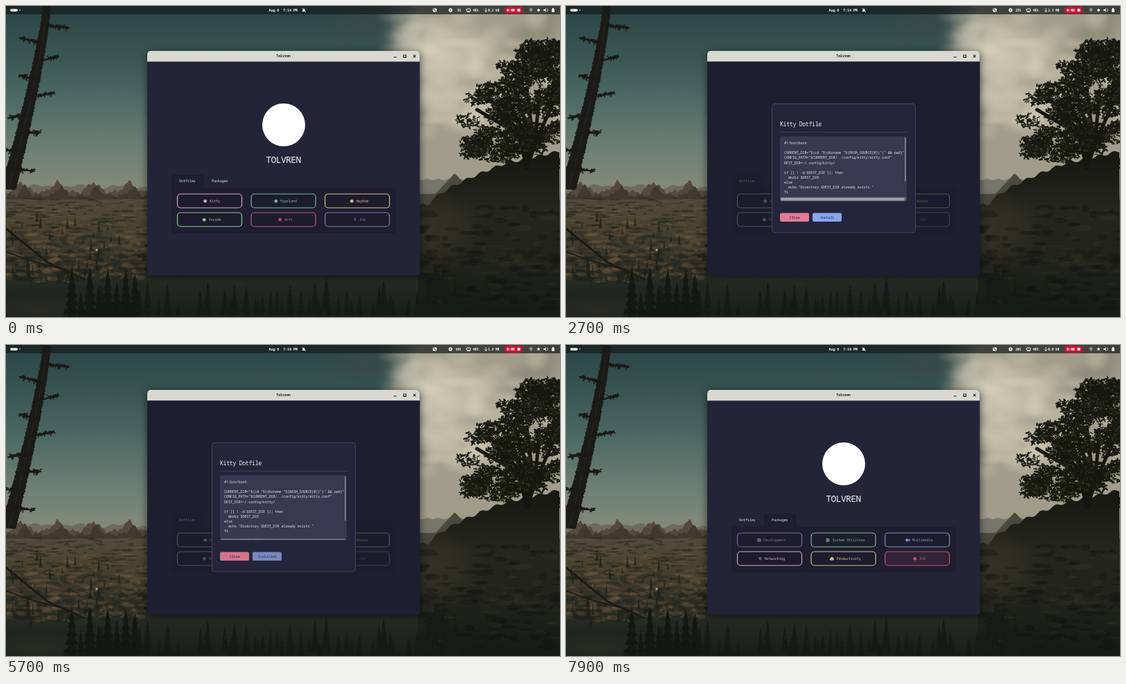
Write an HTML page with a canvas that moves like this. It is 800 px wide and 450 px high and loops after 8 s.

```html
<!DOCTYPE html>
<html lang="en">
<head>
<meta charset="utf-8">
<title>Dotfile installer</title>
<style>
html, body { margin: 0; width: 100%; height: 100%; overflow: hidden; background: #14170f; }
canvas { display: block; width: 800px; height: 450px; }
</style>
</head>
<body>
<canvas id="stage" width="800" height="450"></canvas>
<script>
const LOOP = 8000;
const APP = 'Tolvren';
const ctx = document.getElementById('stage').getContext('2d');
const wallpaper = document.createElement('canvas');
wallpaper.width = 800;
wallpaper.height = 450;

const clamp = v => Math.max(0, Math.min(1, v));
const ramp = (t, from, to) => clamp((t - from) / (to - from));
const ease = p => 1 - (1 - p) ** 3;

function seeded(seed) {
  return () => (seed = (seed * 16807) % 2147483647) / 2147483647;
}

function box(c, x, y, w, h, r, fill, stroke, line = 1) {
  c.beginPath();
  c.roundRect(x, y, w, h, r);
  if (fill) { c.fillStyle = fill; c.fill(); }
  if (stroke) { c.strokeStyle = stroke; c.lineWidth = line; c.stroke(); }
}

function oval(c, x, y, rx, ry, fill) {
  c.beginPath();
  c.ellipse(x, y, rx, ry, 0, 0, 7);
  c.fillStyle = fill;
  c.fill();
}
const dot = (c, x, y, r, fill) => oval(c, x, y, r, r, fill);

function poly(c, fill, ...p) {
  c.beginPath();
  for (let i = 0; i < p.length; i += 2) c.lineTo(p[i], p[i + 1]);
  c.fillStyle = fill;
  c.fill();
}

function path(c, color, width, ...p) {
  c.beginPath();
  for (let i = 0; i < p.length; i += 2) c.lineTo(p[i], p[i + 1]);
  c.strokeStyle = color;
  c.lineWidth = width;
  c.stroke();
}

function arc(x, y, r, from, to, color, width) {
  ctx.beginPath();
  ctx.arc(x, y, r, from, to);
  ctx.strokeStyle = color;
  ctx.lineWidth = width;
  ctx.stroke();
}

// y is the vertical middle of the capitals
function text(str, x, y, color, { size = 5.35, align = 'left', weight = 500 } = {}) {
  ctx.font = `${weight} ${size}px "Noto Sans Mono", "DejaVu Sans Mono", monospace`;
  ctx.letterSpacing = -0.05 * size + 'px';
  ctx.textAlign = align;
  ctx.fillStyle = color;
  ctx.fillText(str, x, y + size * 0.36);
}

// ---- wallpaper ----

function fade(c, top, bottom, ...colors) {
  const g = c.createLinearGradient(0, top, 0, bottom);
  colors.forEach((color, i) => g.addColorStop(i / (colors.length - 1), color));
  return g;
}

function glow(c, x, y, rx, ry, rgb, alpha) {
  c.save();
  c.translate(x, y);
  c.scale(rx, ry);
  const g = c.createRadialGradient(0, 0, 0, 0, 0, 1);
  [1, 0.6, 0].forEach((a, i) => g.addColorStop(i / 2, `rgba(${rgb},${alpha * a})`));
  c.fillStyle = g;
  c.fillRect(-1, -1, 2, 2);
  c.restore();
}

// fills everything below the curve y = height(x)
function land(c, fill, from, to, height) {
  c.beginPath();
  c.moveTo(from, 450);
  for (let x = from; x <= to; x += 2) c.lineTo(x, height(x));
  c.lineTo(to, 450);
  c.fillStyle = fill;
  c.fill();
}

function conifer(c, x, base, h, color) {
  for (let i = 0; i < 6; i++) {
    const top = base - h + i * h * 0.15, w = h * (0.05 + i * 0.025);
    poly(c, color, x, top, x - w, top + h * 0.25, x + w, top + h * 0.25);
  }
}

function drawSky(c) {
  c.fillStyle = fade(c, 0, 270, '#294445', '#385553', '#4d6a64', '#6b7f75', '#858a7b');
  c.fillRect(0, 0, 800, 450);
  const haze = c.createLinearGradient(535, 0, 610, 0);
  haze.addColorStop(0, 'rgba(162,157,139,0)');
  haze.addColorStop(1, 'rgba(162,157,139,1)');
  c.fillStyle = haze;
  c.fillRect(535, 0, 265, 270);
  const rnd = seeded(41);
  for (let i = 0; i < 110; i++) {
    const x = 560 + rnd() * 240, y = 10 + rnd() * 170;
    const bright = rnd() < 0.85 - (x - 560) / 600;
    glow(c, x, y, 14 + rnd() * 26, 8 + rnd() * 18, bright ? '212,205,183' : '130,126,111', 0.35);
  }
  glow(c, 630, 75, 90, 65, '222,215,193', 0.75);
  glow(c, 520, 25, 60, 40, '58,74,71', 0.7);
}

function drawValley(c) {
  const rnd = seeded(7);
  const peak = (x, width) => Math.max(0, 1 - Math.abs((x + 4) % 52 - 26) / width);
  const rough = x => 2 * Math.sin(x * 0.31) + 1.5 * Math.sin(x * 0.83);
  land(c, '#6d6b5d', 0, 598, x => 261 + rough(x / 3));
  land(c, '#54493c', 0, 598, x => 269 - 15 * peak(x, 17) + rough(x));
  land(c, '#40392f', 0, 598, x => 274 - 14 * peak(x - 5, 12) + rough(x + 9));
  c.fillStyle = fade(c, 278, 450, '#51493b', '#49412f', '#353329', '#222821', '#171e19');
  c.fillRect(0, 280, 800, 170);
  for (let i = 0; i < 520; i++) {
    const d = rnd(), x = rnd() * 215, y = 278 + d * 120;
    const shade = rnd() < 0.62 ? 'rgba(27,33,26,.4)' : 'rgba(122,97,67,.3)';
    oval(c, x, y, 2 + rnd() * 9, 0.8 + d * 2.5, shade);
  }
  for (let i = 0; i < 45; i++) {
    conifer(c, rnd() * 210, 310 + rnd() * 100, 7 + rnd() * 13, 'rgba(26,32,25,.7)');
  }
  glow(c, 45, 440, 110, 25, '48,48,38', 0.7);
  for (let i = 0; i < 60; i++) {
    conifer(c, 80 + rnd() * 540, 440 + rnd() * 25, 20 + rnd() * 30, '#151c17');
  }
  for (let i = 0; i < 8; i++) conifer(c, 95 + i * 13, 458, 45 + rnd() * 38, '#121812');
  dot(c, 131, 353, 1.8, '#aaa18a');
}

function drawRightSlope(c) {
  const rnd = seeded(93);
  land(c, '#77766a', 595, 700, x => 251 + Math.sin(x * 0.4));
  land(c, '#4b4a40', 595, 700, x => 272 - 30 * Math.max(0, 1 - Math.abs(x - 648) / 28));
  const slope = x => 288 - 60 * ramp(x, 610, 720) ** 0.7 - 18 * ramp(x, 720, 800) + 2 * Math.sin(x * 0.3);
  land(c, fade(c, 220, 450, '#171912', '#25261e', '#20231b', '#141a14'), 595, 800, slope);
  glow(c, 610, 325, 85, 60, '64,60,47', 0.6);
  for (let i = 0; i < 160; i++) {
    const x = 600 + rnd() * 200, y = 290 + rnd() * 150;
    oval(c, x, y, 3 + rnd() * 12, 1 + rnd() * 4, rnd() < 0.75 ? 'rgba(15,18,13,.3)' : 'rgba(75,66,48,.16)');
  }
  for (let i = 0; i < 14; i++) conifer(c, 600 + rnd() * 50, 420 + rnd() * 40, 25 + rnd() * 30, '#161d17');
}

function drawRightTree(c) {
  const rnd = seeded(23);
  c.lineCap = 'round';
  for (let i = 0; i < 7; i++) {
    path(c, '#14160f', 5, 752, 235, 740 + i * 5, 185, 680 + i * 18, 150 - 35 * Math.sin(i / 2));
  }
  for (let i = 0; i < 95; i++) {
    const y = 58 + rnd() * 172;
    const edge = 652 + 112 * ramp(y, 185, 50) ** 1.4 + 50 * ramp(y, 205, 230);
    const x = edge + rnd() * (812 - edge), spread = 12 + rnd() * 8;
    for (let j = 0; j < 60; j++) {
      const a = rnd() * 6.3, d = Math.sqrt(rnd()) * spread, tilt = rnd() * 6.3;
      const px = x + Math.cos(a) * d, py = y + Math.sin(a) * d * 0.6;
      path(c, rnd() < 0.8 ? '#171911' : '#2a2b20', 1 + rnd() * 1.6,
        px, py, px + Math.cos(tilt) * 4, py + Math.sin(tilt) * 3);
    }
  }
}

function drawLeftTree(c) {
  const bark = '#1b1a16', rnd = seeded(5);
  const center = y => 59 - 52 * (y / 250) ** 1.25;
  for (let y = 0; y < 265; y += 1.5) {
    const half = 4 + y * 0.021 + rnd() * 1.5;
    path(c, bark, 2, center(y) - half, y, center(y) + half, y + 1);
    path(c, 'rgba(84,74,57,.35)', 1, center(y), y, center(y) + rnd() * 3, y + 2);
  }
  for (let i = 0; i < 9; i++) {
    const y = 28 + i * 26, side = i % 2 ? -1 : 1, reach = side * (20 + rnd() * 16), rise = rnd() * 16 - 8;
    path(c, bark, 2.5, center(y), y, center(y) + reach, y + rise);
    for (let j = 0; j < 26; j++) {
      const p = rnd(), x = center(y) + reach * p, top = y + rise * p - 2;
      path(c, bark, 1.5, x, top, x + rnd() * 6 - 3, top + rnd() * 9 - 2);
    }
  }
  path(c, bark, 3, 0, 322, 28, 345, 60, 371, 113, 395);
  path(c, bark, 1.5, 0, 356, 38, 369, 82, 381);
}

function paintWallpaper() {
  const c = wallpaper.getContext('2d');
  [drawSky, drawValley, drawRightSlope, drawRightTree, drawLeftTree].forEach(draw => draw(c));
}

// ---- top bar ----

const CPU = ['3%', '25%', '23%', '12%', '16%', '26%'];
const NET = ['0.1 kB', '451 kB', '2.3 MB', '1.0 kB', '1.9 MB', '0.0 kB'];

function wifi(x, y, color, s = 1) {
  for (const r of [2, 4]) arc(x, y + 2 * s, r * s, -2.4, -0.74, color, s);
  dot(ctx, x, y + 1.7 * s, 0.9 * s, color);
}

function drawTopBar(t) {
  const white = '#eceee9', bold = { weight: 700 }, small = { size: 4.9, weight: 700 };
  ctx.fillStyle = 'rgba(22,28,28,.7)';
  ctx.fillRect(0, 0, 800, 12);
  box(ctx, 6, 4.3, 11, 3.6, 1.8, white);
  dot(ctx, 20, 6, 1.1, '#8d9491');
  text('Aug 6  7:14 PM', 379.5, 6, white, bold);
  poly(ctx, white, 427.5, 8, 430, 3, 432.5, 8);
  path(ctx, white, 0.8, 427, 3, 433, 9);

  const sample = Math.floor((t + 600) / 1500);
  box(ctx, 616.5, 3.5, 5.5, 5, 0.8, white);
  path(ctx, '#29302e', 1, 617.5, 4.5, 621, 7.5);
  dot(ctx, 642, 6, 2.7, white);
  dot(ctx, 642, 6, 1, '#747b77');
  text(CPU[sample], 657, 6, white, { ...small, align: 'right' });
  box(ctx, 665, 4, 5.5, 3.6, 0.6, null, white);
  path(ctx, white, 0.8, 666, 8.7, 670, 8.7);
  text('48%', 674, 6, white, small);
  path(ctx, white, 0.9, 693, 3, 693, 8.5);
  path(ctx, white, 0.9, 691, 6.5, 693, 8.7, 695, 6.5);
  text(NET[sample], 696, 6, white, small);

  box(ctx, 719, 1, 28, 10, 5, '#c51438');
  text('0:0' + Math.floor((t + 100) / 1000), 723, 6, '#fff', bold);
  box(ctx, 738.5, 4, 4, 4, 0.4, '#fff');

  wifi(758, 6, white, 0.9);
  dot(ctx, 769, 6, 2, white);
  box(ctx, 776, 5, 2, 2, 0, white);
  poly(ctx, white, 777, 6, 779.5, 3, 779.5, 9);
  arc(779.5, 6, 2.7, -0.9, 0.9, white, 0.9);
  box(ctx, 788, 4, 4, 5, 0.7, white);
  box(ctx, 789, 3, 2, 1, 0, white);
}

// ---- application window ----

const PANEL = '#1e1e30';

const ICONS = {
  badge: (x, y, color) => dot(ctx, x, y, 2.4, color),
  home(x, y, color) {
    poly(ctx, color, x - 3, y, x, y - 2.8, x + 3, y);
    box(ctx, x - 2, y, 4, 2.6, 0, color);
    box(ctx, x - 0.6, y + 0.7, 1.2, 1.9, 0, PANEL);
  },
  dollar: (x, y, color) => text('$', x, y, color, { size: 6, align: 'center' }),
  chip(x, y, color) {
    box(ctx, x - 2.5, y - 2.2, 5, 4.4, 0.6, color);
    path(ctx, PANEL, 0.6, x - 0.8, y - 1, x + 0.7, y, x - 0.8, y + 1);
  },
  sliders(x, y, color) {
    for (const i of [-1, 0, 1]) {
      path(ctx, color, 0.8, x - 2.6, y + i * 1.8, x + 2.6, y + i * 1.8);
      dot(ctx, x + (i ? -0.8 : 1.2), y + i * 1.8, 0.9, color);
    }
  },
  camera(x, y, color) {
    box(ctx, x - 3, y - 2, 4, 4, 0.7, color);
    poly(ctx, color, x + 0.6, y, x + 3.2, y - 1.8, x + 3.2, y + 1.8);
  },
  wifi: (x, y, color) => wifi(x, y, color, 0.8),
  cloud(x, y, color) {
    dot(ctx, x - 1.5, y + 0.6, 1.7, color);
    dot(ctx, x + 0.3, y - 0.4, 2.1, color);
    box(ctx, x - 2, y, 5, 2.3, 1, color);
  }
};

const DOTFILES = [
  ['Kitty', '#d7a8d1', 'badge'], ['Hyprland', '#78b5a5', 'badge'], ['Waybar', '#d8c291', 'badge'],
  ['Vscode', '#91c98f', 'badge'], ['Wofi', '#bd5f82', 'home'], ['Zsh', '#9078bf', 'dollar']
];
const PACKAGES = [
  ['Development', '#80689f', 'chip'], ['System Utilities', '#86bd88', 'sliders'], ['Multimedia', '#7b92c8', 'camera'],
  ['Networking', '#d0a5bd', 'wifi'], ['Productivity', '#d0bc8e', 'cloud'], ['AUR', '#b85470', 'badge']
];

// the button under the pointer from each time on
const VISITS = [[900, 'Hyprland'], [1450, 'Kitty'], [2400, ''], [6650, 'Development'],
  [7400, 'System Utilities'], [7550, 'Productivity'], [7700, 'AUR'], [LOOP, '']];

function hoverOf(label, t) {
  const i = VISITS.findIndex(visit => visit[1] === label);
  if (i < 0) return 0;
  const enter = VISITS[i][0], leave = VISITS[i + 1][0];
  return ramp(t, enter, enter + 200) * ramp(t, leave + 200, leave);
}

function drawButton([label, color, icon], i, t) {
  const x = 247.5 + (i % 3) * 106.6, y = 272 + Math.floor(i / 3) * 27;
  box(ctx, x, y, 93, 20, 4.5, '#1c1c2d');
  ctx.globalAlpha = 0.15 * hoverOf(label, t);
  box(ctx, x, y, 93, 20, 4.5, color);
  ctx.globalAlpha = 1;
  box(ctx, x, y, 93, 20, 4.5, null, color, 1.2);
  const middle = x + 54, half = label.length * 1.47;
  text(label, middle, y + 10.3, color, { align: 'center' });
  ICONS[icon](middle - half - 6.5, y + 10.3, color);
}

function drawWindow(t) {
  ctx.save();
  ctx.shadowColor = 'rgba(0,0,0,.6)';
  ctx.shadowBlur = 12;
  ctx.shadowOffsetY = 2;
  box(ctx, 204, 65, 393.5, 324.5, [5, 5, 0, 0], '#232438');
  ctx.restore();
  box(ctx, 204, 65, 393.5, 15.5, [5, 5, 0, 0], '#d9d9d1');
  const ink = '#24241f';
  text(APP, 400.5, 72.5, ink, { align: 'center', weight: 700 });
  path(ctx, ink, 1.1, 559.8, 74, 563.8, 74);
  box(ctx, 574.2, 71, 3.4, 3.4, 0, null, ink, 1.2);
  path(ctx, ink, 1.1, 588.2, 70.8, 591.8, 74.4);
  path(ctx, ink, 1.1, 591.8, 70.8, 588.2, 74.4);

  dot(ctx, 401, 172, 31, '#fff');
  text(APP.toUpperCase(), 400.5, 222, '#f4f4f8', { size: 13.1, align: 'center' });

  const packages = t >= 6500;
  box(ctx, 239, 263, 324, 66, [0, 4, 4, 4], PANEL);
  box(ctx, packages ? 286 : 239, 244, 47, 20, [4, 4, 0, 0], PANEL);
  text('Dotfiles', 250, 253.3, '#dadbe8');
  text('Packages', 297, 253.3, '#dadbe8');
  (packages ? PACKAGES : DOTFILES).forEach((button, i) => drawButton(button, i, t));
}

// ---- script dialog ----

const SCRIPT = `#!/bin/bash

CURRENT_DIR="$(cd "$(dirname "\${BASH_SOURCE[0]}")" && pwd)"
CONFIG_PATH="$CURRENT_DIR/../config/kitty/kitty.conf"
DEST_DIR=~/.config/kitty/

if [[ ! -d $DEST_DIR ]]; then
  mkdir $DEST_DIR
else
  echo "Directory $DEST_DIR already exists."
fi

if [ -f $DEST_DIR/kitty.conf ]; then`.split('\n');

function drawScript(t) {
  box(ctx, 309, 188.5, 183, 94, 3, '#373950');
  ctx.save();
  ctx.beginPath();
  ctx.rect(309, 189, 183, 93);
  ctx.clip();
  SCRIPT.forEach((line, i) => text(line, 315, 198.3 + i * 7.08, '#d9dbe7'));
  ctx.restore();
  box(ctx, 489, 190, 2, 64, 1, '#777a8d');
  box(ctx, 310, 280.4, 180, 1.4, 0.7, '#878a9b');
  ctx.save();
  ctx.globalAlpha *= ramp(t, 3700, 3450);
  box(ctx, 309, 276.5, 183, 6, [0, 0, 3, 3], '#55576a');
  box(ctx, 310, 277.6, 179, 3.8, 1.9, '#a0a1a7');
  ctx.restore();
}

function drawAction(label, x, fill, ink) {
  box(ctx, x, 299.5, 42, 12.5, 2, fill);
  text(label, x + 21, 305.6, ink, { align: 'center' });
}

function drawDialog(t) {
  const shown = ease(ramp(t, 2150, 2450)) * (1 - ease(ramp(t, 5800, 6100)));
  if (!shown) return;
  ctx.save();
  ctx.globalAlpha = shown;
  ctx.fillStyle = 'rgba(27,28,43,.66)';
  ctx.fillRect(204, 80.5, 393.5, 309);
  const zoom = 0.95 + 0.05 * shown;
  ctx.translate(401, 235);
  ctx.scale(zoom, zoom);
  ctx.translate(-401, -235);

  box(ctx, 297.5, 141.5, 207, 186.5, 4, '#23253a', '#45475c');
  text('Kitty Dotfile', 309, 171, '#eceef6', { size: 8.4 });
  path(ctx, '#3b3d52', 1, 309, 182.5, 493, 182.5);
  drawScript(t);

  drawAction('Close', 309, t < 5600 ? '#e37b95' : '#d6738c', '#272237');
  if (t < 4900) drawAction('Install', 356, '#86a8ec', '#222a45');
  else drawAction('Installed', 356, '#7987bd', '#30365a');
  ctx.restore();
}

function frame(now) {
  const t = now % LOOP;
  ctx.drawImage(wallpaper, 0, 0);
  drawTopBar(t);
  drawWindow(t);
  drawDialog(t);
  requestAnimationFrame(frame);
}

paintWallpaper();
requestAnimationFrame(frame);
</script>
</body>
</html>
```
